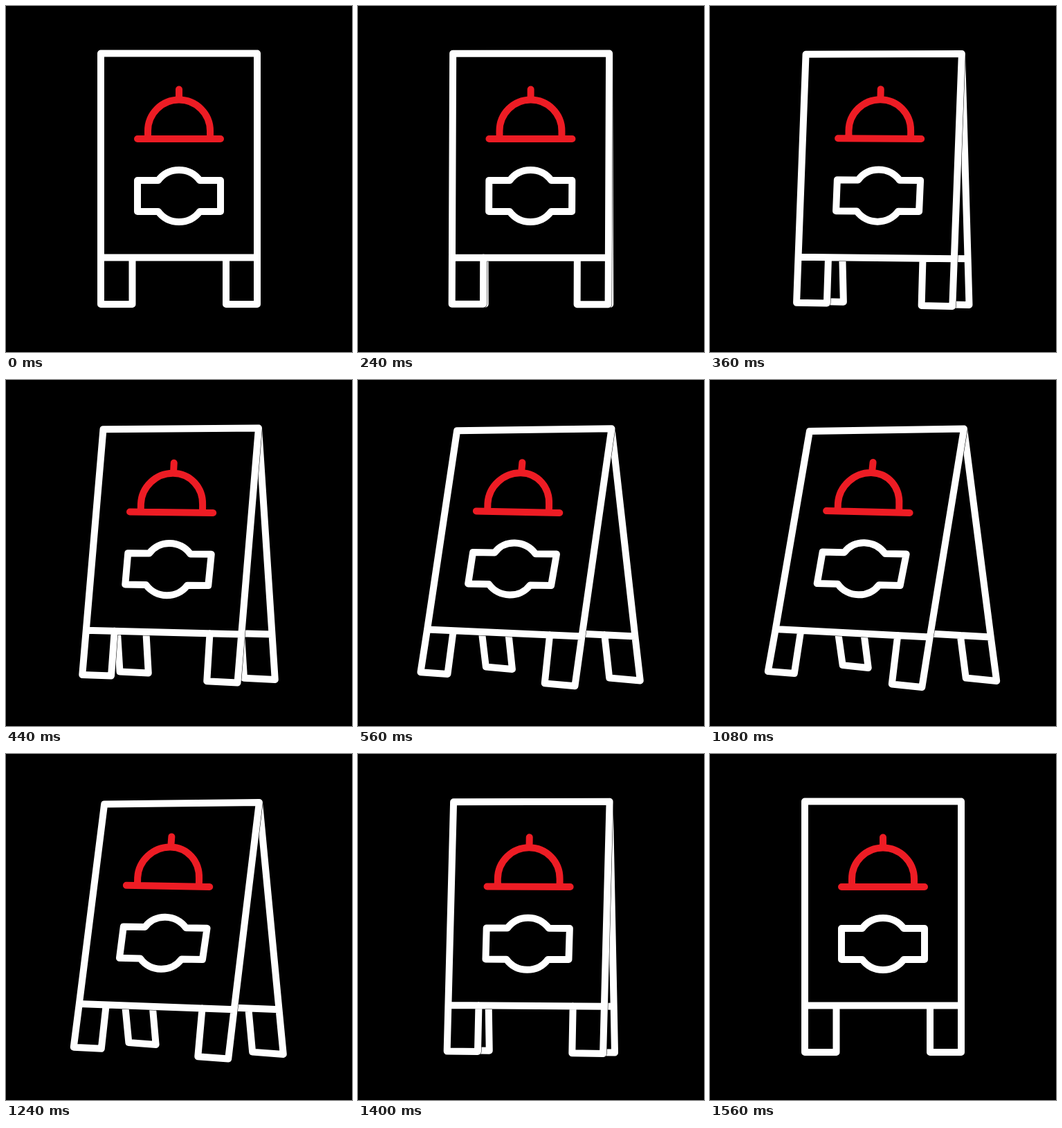
An HTML page for the animation above (1840 ms loop, 500 by 500 pixels).

```html
<!DOCTYPE html>
<html lang="en">
<head>
<meta charset="utf-8">
<title>Menu board</title>
<style>
  html, body { margin: 0; width: 100%; height: 100%; overflow: hidden; background: #000; }
  svg { display: block; width: 100%; height: 100%; }
  path { fill: none; stroke: #fff; stroke-width: 10; stroke-linecap: round; stroke-linejoin: round; }
  .mask { fill: #000; stroke: #000; stroke-width: 11; }
  .red { stroke: #ed1c24; }
</style>
</head>
<body>
<svg id="stage" viewBox="0 0 500 500"></svg>
<script>
const LOOP = 1840, STEP = 40;
const OPEN = { start: 160, steps: 14 };
const CLOSE = { start: 1040, steps: 13 };

const front = {
  folded: 'M137 68.5 L363 68.5 L363 363.5 L137 363.5 Z ' +
          'M137 363.5 L137 431 L182.5 431 L182.5 363.5 ' +
          'M318 363.5 L318 431 L363 431 L363 363.5',
  open:   'M144 74 L367 70.5 L317.5 371.5 L94.5 360 Z ' +
          'M94.5 360 L83.5 421 L121.5 424 L131 362 ' +
          'M271 369 L262.5 439.5 L306 444 L317.5 371.5'
};
const back = {
  folded: 'M363 68.5 L363 363.5 L363 431 L318 431 L318 363.5 ' +
          'M137 363.5 L363 363.5 ' +
          'M137 363.5 L137 431 L182.5 431 L182.5 363.5',
  open:   'M367 70.5 L406 371.5 L414.5 435 L370 430.5 L362 369 ' +
          'M184.5 359 L406 371.5 ' +
          'M184.5 359 L192 412 L229 416 L222 361'
};
const plate = {
  folded: 'M190 252 L220 252 C235 232 265 232 280 252 L310 252 ' +
          'L310 297 L280 297 C265 317 235 317 220 297 L190 297 Z',
  open:   'M162.5 248.5 L194 249.2 C208 229.5 238 231 253 251 L283.5 251.5 ' +
          'L274.5 297 L244 296.3 C229.5 316 198.5 314.5 184.5 294.8 L154.5 294 Z'
};
const cloche = {
  folded: 'M190 192 L310 192 M250 120.5 L250 135 ' +
          'M205 192 L205 180.5 C205 155.65 225.15 135.5 250 135.5 ' +
          'C274.85 135.5 295 155.65 295 180.5 L295 192',
  open:   'M168 189 L288.5 192 M235.5 119 L234 133 ' +
          'M184.5 189.5 L184.8 178 C186.5 153.2 208.5 133.5 233 134 ' +
          'C258 134.5 274.5 155 273.2 180 L273 191.5'
};

const stage = document.getElementById('stage');

function addPart(shape, className = '') {
  const node = document.createElementNS('http://www.w3.org/2000/svg', 'path');
  node.setAttribute('class', className);
  stage.append(node);
  return { node, shape };
}

const parts = [
  addPart(back),
  addPart(front, 'mask'),
  addPart(front),
  addPart(plate),
  addPart(cloche, 'red')
];

function morph({ folded, open }, amount) {
  const ends = open.match(/[\d.]+/g);
  let i = 0;
  return folded.replace(/[\d.]+/g, n => (+n + (ends[i++] - n) * amount).toFixed(2));
}

function ease(x) {
  return x < 0.5 ? 0.5 * (2 * x) ** 2.4 : 1 - 0.5 * (2 - 2 * x) ** 2.4;
}

// Eased progress of a phase, held for one step at a time.
function progress(time, { start, steps }) {
  const step = Math.floor((time - start) / STEP);
  return ease(Math.min(1, Math.max(0, step / steps)));
}

let shown = -1;

function draw(time) {
  const amount = progress(time, OPEN) - progress(time, CLOSE);
  if (amount === shown) return;
  shown = amount;
  for (const { node, shape } of parts) node.setAttribute('d', morph(shape, amount));
}

const begin = performance.now();

function tick() {
  draw((performance.now() - begin) % LOOP);
  requestAnimationFrame(tick);
}
tick();
</script>
</body>
</html>
```
